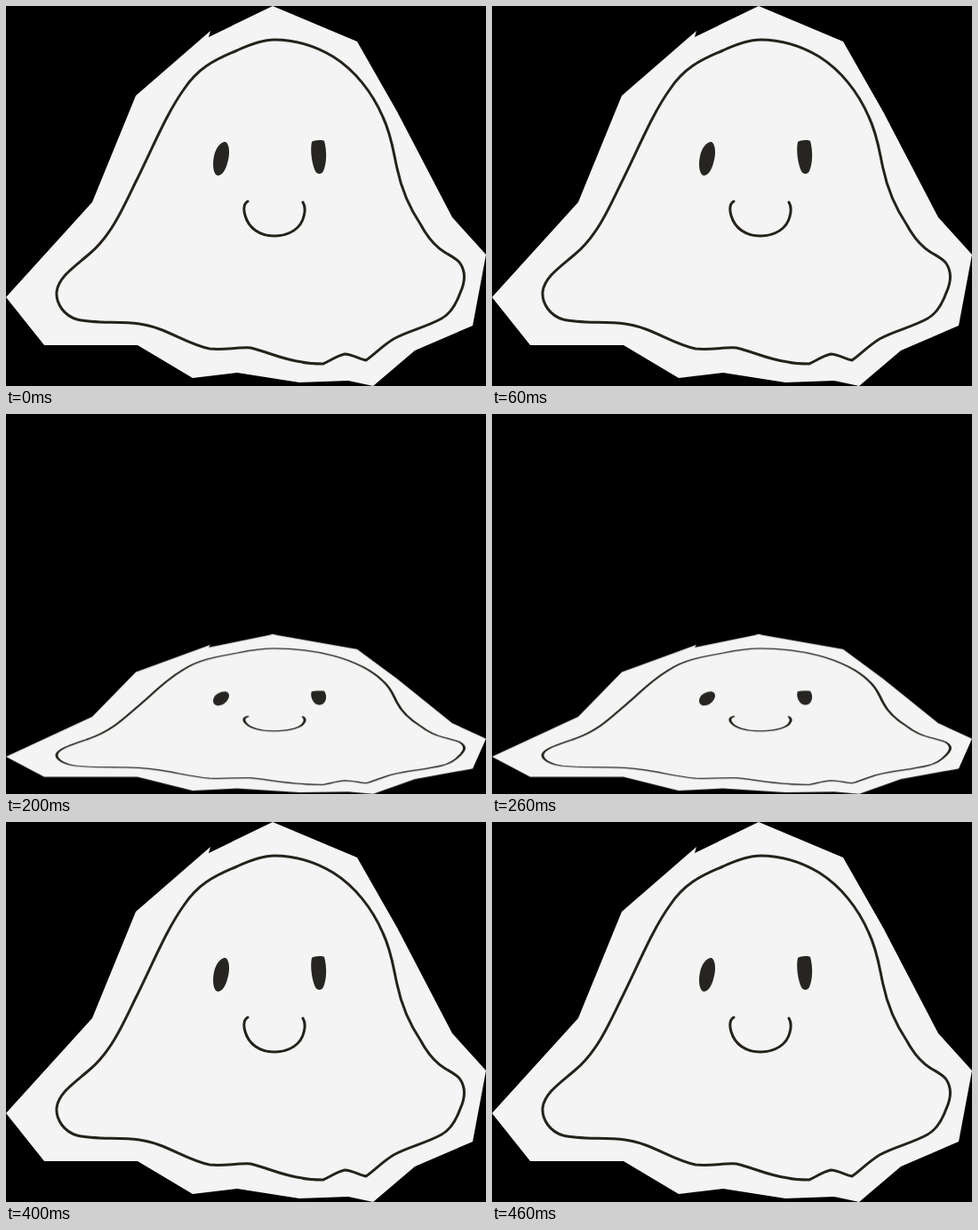
An HTML page that plays this animation: 540x428 px, repeating every 0.5 s.

```html
<!DOCTYPE html>
<html lang="en">
<head>
<meta charset="utf-8">
<title>Squashing ghost</title>
<style>
  html, body {
    margin: 0;
    width: 100%;
    height: 100%;
    overflow: hidden;
    background: #000;
  }
  svg {
    display: block;
    width: 540px;
    height: 428px;
  }
  .ghost {
    transform-origin: 270px 428px;
    animation: squash 500ms step-end infinite;
  }
  .paper { fill: #f4f4f4; }
  .line {
    fill: none;
    stroke: #25221b;
    stroke-width: 3;
    stroke-linecap: round;
    stroke-linejoin: round;
  }
  .eye { fill: #262521; }

  @keyframes squash {
    0%, 80%, 100% { transform: scaleY(1); }
    20%, 60% { transform: scaleY(.717); }
    40% { transform: scaleY(.42); }
  }
</style>
</head>
<body>
<svg viewBox="0 0 540 428">
  <g class="ghost">
    <path class="paper" d="M0 328 L97 221 L146 101 L230 28 L228 35 L300 0 L395 40
      L440 119 L502 238 L540 280 L525 360 L460 388 L413 428 L385 422 L330 424
      L260 413 L210 419 L148 382 L43 382 Z"/>
    <path class="line" d="M302 38 C325 38 348 45 368 57 C392 72 412 97 424 125
      C434 146 436 166 440 183 C446 212 457 232 467 247 C474 260 482 270 493 277
      C501 282 508 285 511 290 C517 299 517 310 511 323 C507 334 501 346 490 352
      C472 362 452 366 436 375 C423 383 414 393 405 399 C397 398 390 392 381 392
      C372 394 364 400 357 403 C350 403 341 403 333 401 C310 398 293 389 275 385
      C260 384 245 388 229 386 C203 381 180 362 150 358 C125 355 100 358 80 353
      C66 349 56 336 57 322 C59 305 78 293 94 279 C118 259 132 227 145 200
      C165 160 180 122 200 94 C215 71 233 61 260 50 C275 43 288 38 302 38 Z"/>
    <path class="eye" d="M247 153 C252 156 252 168 249 177 C247 185 243 191 238 191
      C233 189 232 179 234 169 C236 160 241 153 247 153 Z"/>
    <path class="eye" d="M344 153 C347 151 355 150 358 152 C361 162 361 177 357 186
      C355 190 350 190 348 186 C344 178 342 162 344 153 Z"/>
    <path class="line" d="M272 220 C267 223 267 229 269 236 C273 250 285 259 302 259
      C319 259 332 250 335 237 C337 230 337 226 334 221"/>
  </g>
</svg>
</body>
</html>
```
